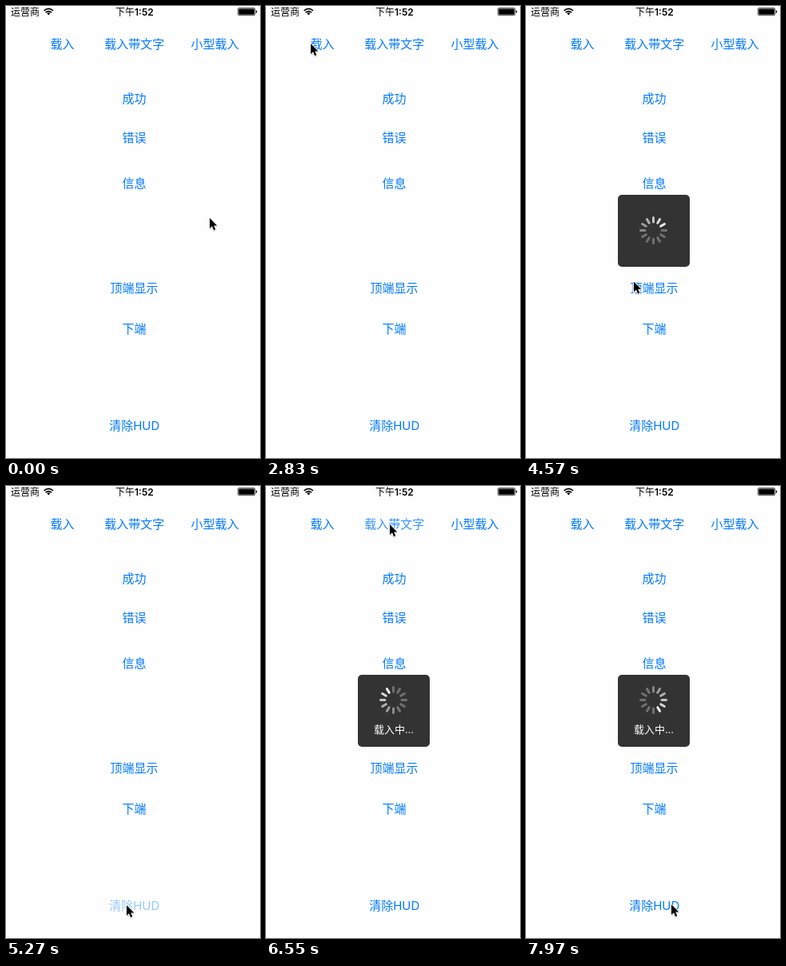
These frames come from a looping animation (318x565 px, 8000 ms). An HTML page:

```html
<!DOCTYPE html>
<html lang="zh-CN">
<head>
<meta charset="utf-8">
<style>
  html, body { margin: 0; width: 100%; height: 100%; overflow: hidden; background: #fefefe; }
  svg { display: block; width: 100vw; height: 100vh; }
  text { font-family: Inter, "Noto Sans CJK SC", "Noto Sans CJK", "Noto Sans", sans-serif; }
  .btn { font-size: 15px; fill: #007aff; text-anchor: middle; }
</style>
</head>
<body>
<svg viewBox="0 0 318 565">
  <defs>
    <filter id="soft" x="-50%" y="-50%" width="200%" height="200%"><feGaussianBlur stdDeviation="0.9"/></filter>
    <path id="arrow" d="M1 1V14L4 11.2L6.1 16.2L8.3 15.2L6.2 10.5H10.3Z"/>
  </defs>
  <rect width="318" height="565" fill="#fefefe"/>
  <text x="6" y="11.6" font-size="12">运营商</text>
  <g fill="none" stroke="#000" stroke-width="1.7">
    <path d="M47.6 5.9Q53.3 .9 59 5.9M49.6 8.1Q53.3 5 57 8.1"/>
    <path d="M51.2 9.1Q53.3 7.4 55.4 9.1L53.3 11.4Z" fill="#000" stroke="none"/>
  </g>
  <text x="137" y="11.6" font-size="12" font-weight="500">下午<tspan font-weight="600">1:52</tspan></text>
  <rect x="290.3" y="2.5" width="21.6" height="9.2" rx="1.6" fill="none" stroke="#000" stroke-width=".7"/>
  <rect x="291.3" y="3.5" width="19.6" height="7.2" rx=".8"/>
  <path d="M312.8 5.3Q314.4 5.8 314.4 7.1T312.8 8.9Z"/>
  <g id="buttons"></g>
  <g id="hud">
    <rect x="115" y="236" width="90" height="90" rx="5" fill="#333"/>
    <g id="spin" stroke="#fff" stroke-width="3" stroke-linecap="round"></g>
    <text id="msg" x="160" y="308.6" font-size="13" fill="#fff" text-anchor="middle">载入中...</text>
  </g>
  <g id="cursor">
    <use href="#arrow" y="1.2" opacity=".45" filter="url(#soft)"/>
    <use href="#arrow" fill="#fff" stroke="#fff" stroke-width="1.7" stroke-linejoin="round"/>
    <use href="#arrow"/>
  </g>
</svg>
<script>
const NS = "http://www.w3.org/2000/svg";
const $ = id => document.getElementById(id);
const LOOP = 8000, STEP = 117.2, SPOKES = 12;

function add(parent, tag, attrs, text) {
  const el = document.createElementNS(NS, tag);
  for (const name in attrs) el.setAttribute(name, attrs[name]);
  if (text) el.textContent = text;
  return parent.appendChild(el);
}

const buttons = [
  ["载入", 70.5, 47], ["载入带文字", 160.8, 47], ["小型载入", 261.5, 47],
  ["成功", 160.5, 115], ["错误", 160.5, 164], ["信息", 160.5, 221],
  ["顶端显示", 160.5, 352], ["下端", 160.5, 403], ["清除HUD", 160.7, 524]
].map(([label, x, y]) => add($("buttons"), "text", { class: "btn", x, y: y + 5.5 }, label));

const spokes = Array.from({ length: SPOKES }, (_, i) =>
  add($("spin"), "path", { d: "M0-10.6V-16", transform: `rotate(${i * 30})` }));

// tick, x, y, eased
const path = [
  [0, 254, 264], [1, 254, 264], [2, 253, 261], [3, 253, 258], [4, 253, 258],
  [5, 253, 254], [6, 253, 252], [11, 253, 252], [12, 253, 251], [18, 20, 154, 1],
  [19, 4, 96], [20, -4, 53], [21, -4, 53], [22, 10, 41], [23, 40, 39], [24, 55, 46],
  [26, 57, 46], [28, 60, 45], [33, 60, 45], [35, 111, 58], [42, 149, 529, 1],
  [43, 150, 523], [45, 150, 523], [46, 152, 470], [48, 160, 180], [49, 158, 63],
  [50, 154, 47], [59, 154, 47], [63, 192, 79, 1], [64, 230, 145], [65, 260, 260],
  [66, 250, 390], [67, 212, 490], [68, 181, 522]
];

function cursorAt(k) {
  const i = path.findIndex(p => p[0] >= k);
  if (i < 0) return path[path.length - 1].slice(1, 3);
  if (i === 0) return path[0].slice(1, 3);
  const a = path[i - 1], b = path[i];
  let u = (k - a[0]) / (b[0] - a[0]);
  if (b[3]) u = u * u * (3 - 2 * u);
  return [a[1] + (b[1] - a[1]) * u, a[2] + (b[2] - a[2]) * u];
}

// each tap: button index, press tick, release tick
const taps = [[0, 26, 27], [8, 44, 45], [1, 53, 54]];
const recover = [0.4, 0.6, 0.8, 0.95];

function tapOpacity(k, press, release) {
  if (k < press) return 1;
  return recover[Math.max(0, k - release)] ?? 1;
}

function drawHud(k) {
  const second = k >= 55;
  const shown = second ? (k > 55 ? 1 : 0.6) : k > 27 && k < 45 ? 1 : k === 27 ? 0.5 : 0;
  $("hud").setAttribute("opacity", shown);
  $("msg").setAttribute("opacity", second ? 1 : 0);
  $("spin").setAttribute("transform", `translate(159.5 ${second ? 267.5 : 280.5})`);
  const head = Math.floor(second ? 11.97 + (k - 56) * 1.42 : 1.5 + (k - 30) * 1.42);
  spokes.forEach((s, i) => {
    const age = ((head - i) % SPOKES + SPOKES) % SPOKES;
    s.setAttribute("opacity", Math.max(0.3, 0.92 - age * 0.1).toFixed(2));
  });
}

function draw(t) {
  const k = Math.floor((t % LOOP + 14) / STEP);
  const [x, y] = cursorAt(k);
  $("cursor").setAttribute("transform", `translate(${x.toFixed(1)} ${y.toFixed(1)})`);
  for (const [i, press, release] of taps)
    buttons[i].setAttribute("opacity", tapOpacity(k, press, release));
  drawHud(k);
}

const start = performance.now();
function tick() {
  draw(performance.now() - start);
  requestAnimationFrame(tick);
}
tick();
</script>
</body>
</html>
```
